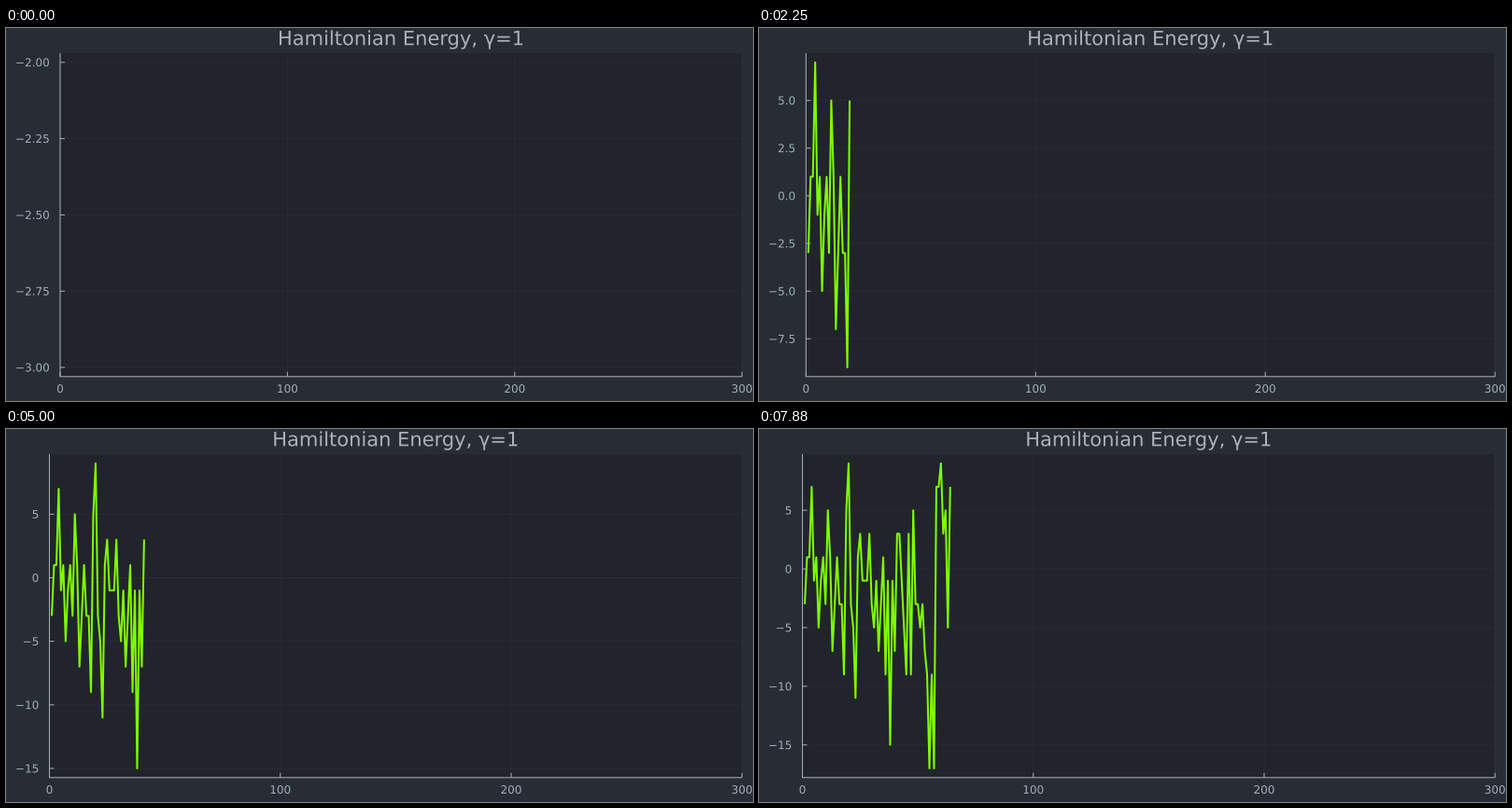
Write a matplotlib script that moves like this. It is 800x400 px and loops after 8000 ms.

```python
import math

import matplotlib.pyplot as plt
from matplotlib.animation import FuncAnimation
from matplotlib.patches import PathPatch, Rectangle
from matplotlib.textpath import TextPath

plt.rcParams["font.family"] = "DejaVu Sans"

W, H, PT = 800, 400, 0.72           # stage in pixels, points per pixel
BG, PANEL, FG, LABEL, LINE = "#282C34", "#21252B", "#ADB2B7", "#9EB1BE", "#7FFF00"
RIGHT, TOP, BOTTOM = 788.2, 27, 373.8
X_MAX, TICK, FONT = 300, 5, 12

ENERGY = [-3, 1, 1, 7, -1, 1, -5, -1, 1, -3, 5, 1, -7, -3, 1, -3,
          -3, -9, 5, 9, -3, -5, -11, 1, 3, -1, -1, -1, 3, -3, -5, -1,
          -7, -3, 1, -9, -1, -15, -1, -7, 3, 3, -1, -5, -9, 3, -9, 5,
          -3, -3, -5, -3, -7, -9, -17, -9, -17, 7, 7, 9, 3, 5, -5, 7]

# largest data span for which each tick step is used
STEPS = ((1, 0.25), (4, 1), (10, 2), (18, 2.5), (40, 5))

fig = plt.figure(figsize=(W / 100, H / 100), dpi=100, facecolor=BG)
ax = fig.add_axes([0, 0, 1, 1])


def advance(s):
    """Width of a number label in pixels."""
    return FONT * sum({"−": 0.838, ".": 0.318}.get(c, 0.636) for c in s)


def text(x, y, s, size, color):
    """Text with its baseline starting at pixel (x, y), y counted downwards."""
    path = TextPath((x, H - y), s, size=size)
    ax.add_patch(PathPatch(path, fc=color, lw=0))


def stroke(xs, ys, color=FG, width=1, **kw):
    ax.plot(xs, [H - y for y in ys], color=color, lw=width * PT, snap=False,
            solid_capstyle="butt", solid_joinstyle="round", **kw)


def y_ticks(lo, hi, pad):
    step = next(s for span, s in STEPS if hi - lo <= span)
    digits = {0.25: 2, 2.5: 1}.get(step, 0)
    first = math.ceil((lo - pad) / step)
    last = math.floor((hi + pad) / step)
    values = [k * step for k in range(first, last + 1)]
    return [(v, f"{v:.{digits}f}".replace("-", "−")) for v in values]


def draw(i):
    ax.clear()
    ax.axis("off")
    ax.set(xlim=(0, W), ylim=(0, H))

    data = ENERGY[:i + 1]
    lo, hi = min(data), max(data)
    if lo == hi:
        hi = lo + 1
    pad = 0.03 * (hi - lo)
    ticks = y_ticks(lo, hi, pad)
    left = 21.2 + max(advance(s) for _, s in ticks)

    def px(x):
        return left + (RIGHT - left) * x / X_MAX

    def py(y):
        return TOP + (BOTTOM - TOP) * (hi + pad - y) / (hi - lo + 2 * pad)

    ax.add_patch(Rectangle((left, H - BOTTOM), RIGHT - left, BOTTOM - TOP,
                           fc=PANEL, lw=0))

    for x in range(0, X_MAX + 1, 100):
        gx, s = px(x), str(x)
        stroke([gx, gx], [TOP, BOTTOM], alpha=0.05)
        stroke([gx, gx], [BOTTOM, BOTTOM - TICK])
        text(gx - advance(s) / 2, 391, s, FONT, LABEL)
    for y, s in ticks:
        gy = py(y)
        stroke([left, RIGHT], [gy, gy], alpha=0.05)
        stroke([left, left + TICK], [gy, gy])
        text(left - 11.2 - advance(s), gy + 4.4, s, FONT, LABEL)
    stroke([left, left, RIGHT], [TOP, BOTTOM, BOTTOM])

    title = "Hamiltonian Energy, γ=1"
    box = TextPath((0, 0), title, size=21).get_extents()
    text((left + RIGHT) / 2 - (box.x0 + box.x1) / 2, 18.3, title, 21, FG)

    if len(data) > 1:
        stroke([px(k + 1) for k in range(len(data))], [py(v) for v in data],
               LINE, 2)
    return []


anim = FuncAnimation(fig, draw, frames=len(ENERGY), interval=125,
                     repeat=True, repeat_delay=0)
plt.show()
```
